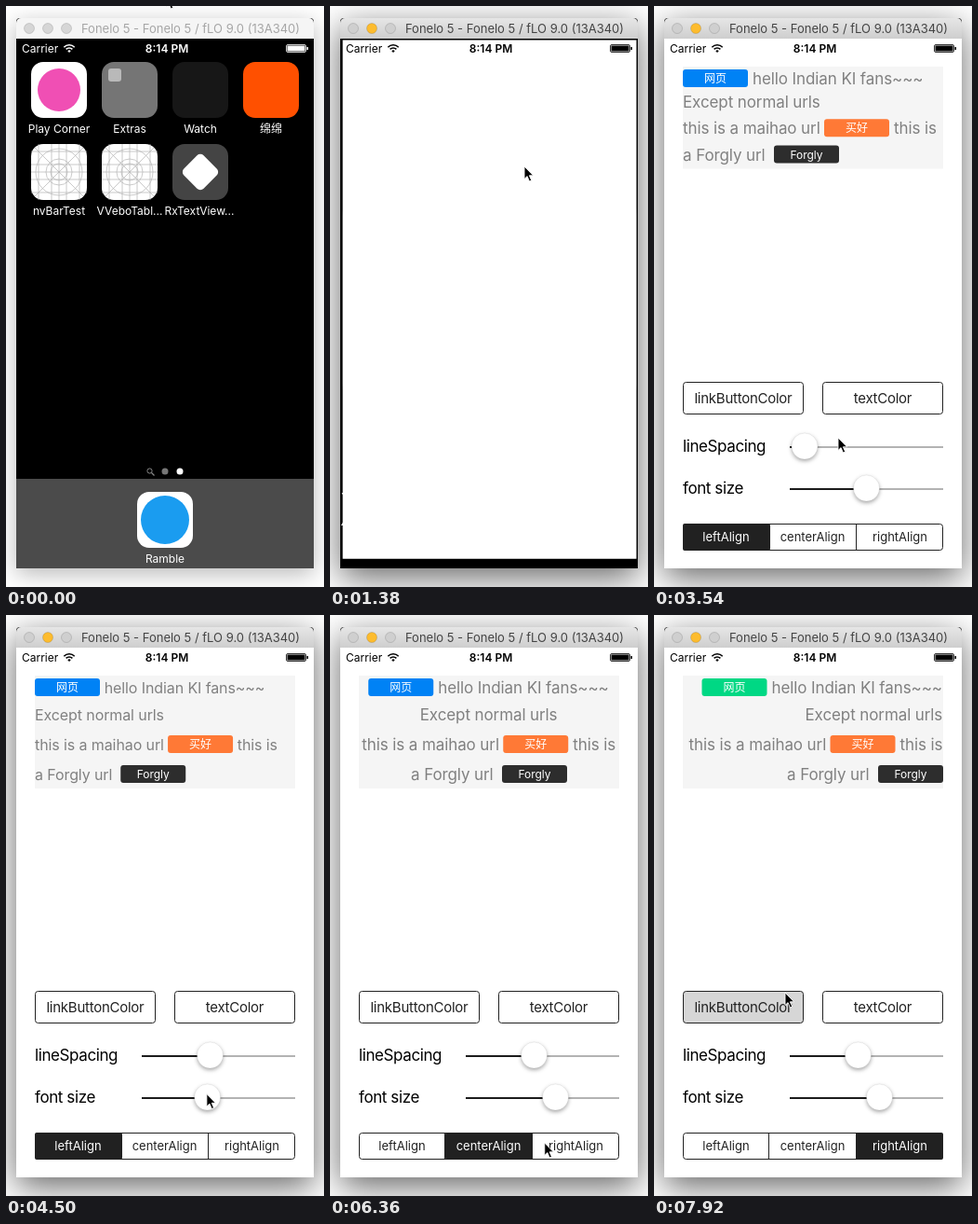
An HTML page that plays this animation: 342 by 623 pixels, repeating every 8000 ms.

```html
<!DOCTYPE html>
<html lang="en">
<head>
<meta charset="utf-8">
<title>Text view demo</title>
<style>
html, body { margin: 0; width: 100%; height: 100%; overflow: hidden; background: #fff; }
svg { display: block; width: 342px; height: 623px; font-family: Inter, "Noto Sans CJK SC", "Noto Sans CJK", sans-serif; }
.mid { text-anchor: middle; }
.s12 { font-size: 12px; }
.s13 { font-size: 13px; }
.s15 { font-size: 15px; letter-spacing: -.25px; }
.s17 { font-size: 17px; letter-spacing: -.4px; }
.edge { stroke: #222; }
.thumb { fill: #fff; stroke: #0001; filter: drop-shadow(0 2px 2px #0005); }
</style>
</head>
<body>
<svg viewBox="0 0 342 623">
  <defs>
    <clipPath id="screen"><path d="M11 35h320v568h-320z"/></clipPath>
    <linearGradient id="bar" x2="0" y2="1"><stop stop-color="#e6e6e6"/><stop offset="1" stop-color="#cecece"/></linearGradient>
    <g id="grid">
      <rect width="60" height="60" rx="13" fill="#fff"/>
      <g fill="none" stroke="#b4b4b4" stroke-width=".7">
        <path d="M8 0v60M22 0v60M30 0v60M38 0v60M52 0v60M0 8h60M0 22h60M0 30h60M0 38h60M0 52h60M4 4l52 52M56 4l-52 52"/>
        <circle cx="30" cy="30" r="9"/><circle cx="30" cy="30" r="14"/><circle cx="30" cy="30" r="25"/>
      </g>
    </g>
  </defs>

  <rect id="shadow" x="11" y="13" width="320" height="590" rx="4"/>
  <path id="title" d="M11 35V18a5 5 0 0 1 5-5h310a5 5 0 0 1 5 5v17z"/>
  <g id="lights" stroke="#0002"><circle cx="25" cy="24" r="5.5"/><circle id="yellow" cx="45" cy="24" r="5.5"/><circle cx="65" cy="24" r="5.5"/></g>
  <text id="caption" class="mid s13" x="198.5" y="28.5">Fonelo 5 - Fonelo 5 / fLO 9.0 (13A340)</text>

  <g clip-path="url(#screen)">
    <path d="M11 35h320v568h-320z"/>
    <g id="home" class="mid s12" fill="#fff">
      <rect x="27" y="60" width="60" height="60" rx="13"/><circle cx="57" cy="90" r="23" fill="#f04fb4"/>
      <rect x="103" y="60" width="60" height="60" rx="13" fill="#757575"/><rect x="110" y="67" width="14" height="14" rx="3" fill="#b9b9b9"/>
      <rect x="179" y="60" width="60" height="60" rx="13" fill="#171717"/>
      <rect x="255" y="60" width="60" height="60" rx="13" fill="#ff5000"/>
      <use href="#grid" x="27" y="148"/><use href="#grid" x="103" y="148"/>
      <rect x="179" y="148" width="60" height="60" rx="13" fill="#444"/>
      <rect x="194" y="163" width="30" height="30" rx="5" transform="rotate(45 209 178)"/>
      <rect id="dim" x="179" y="148" width="60" height="60" rx="13" fill="#000"/>
      <text x="57" y="136">Play Corner</text><text x="133" y="136">Extras</text>
      <text x="209" y="136">Watch</text><text x="285" y="136">绵绵</text>
      <text x="57" y="224">nvBarTest</text><text x="133" y="224">VVeboTabl...</text><text x="208" y="224">RxTextView...</text>
      <path d="M156.500 500.500l3 3" stroke="#888" stroke-width="1.300"/><circle cx="154.500" cy="498.500" r="2.600" fill="none" stroke="#888"/>
      <circle cx="171" cy="499" r="3.500" fill="#777"/><circle cx="187" cy="499" r="3.500"/>
      <path d="M11 507h320v96h-320z" fill="#4b4b4b"/>
      <rect x="141" y="521" width="60" height="60" rx="13"/><circle cx="171" cy="551" r="26" fill="#1a9cf0"/>
      <text x="171" y="597">Ramble</text>
    </g>

    <rect id="launch" fill="#fff"/>
    <g id="app">
      <rect id="panel" x="31" y="65" width="280" fill="#f5f5f5"/>
      <g id="lines"></g>
      <rect id="linkBtn" class="edge" x="31.500" y="403.500" width="129" height="34" rx="3"/>
      <rect class="edge" x="181.500" y="403.500" width="129" height="34" rx="3" fill="#fff"/>
      <text class="mid s15" x="96" y="426" fill="#222">linkButtonColor</text>
      <text class="mid s15" x="246" y="426" fill="#222">textColor</text>
      <text class="s17" x="31" y="478">lineSpacing</text>
      <text class="s17" x="31" y="523">font size</text>
      <path d="M146 473h165M146 518h165" stroke="#b3b3b3" stroke-width="2"/>
      <path id="filled" stroke="#1c1c1c" stroke-width="2"/>
      <circle id="space" class="thumb" cy="472" r="14"/>
      <circle id="size" class="thumb" cy="517" r="14"/>
      <rect id="picked" y="555" width="94" height="29" rx="2" fill="#212121"/>
      <rect class="edge" x="31.500" y="555.500" width="279" height="28" rx="3" fill="none"/>
      <path class="edge" d="M123.500 555v29M217.500 555v29"/>
      <g id="tabs" class="mid s13"><text x="77.500" y="574">leftAlign</text><text x="170.500" y="574">centerAlign</text><text x="264.500" y="574">rightAlign</text></g>
    </g>

    <g id="status" class="s12">
      <text x="17" y="49.500">Carrier</text>
      <text class="mid" x="173" y="49.500" font-weight="600">8:14 PM</text>
      <path d="M62.300 44.200a8 8 0 0 1 11.400 0M64.600 46.400a4.800 4.800 0 0 1 6.800 0" fill="none" stroke="currentColor" stroke-width="1.600"/>
      <path d="M66.300 48.200a2.400 2.400 0 0 1 3.400 0l-1.700 1.800z"/>
      <rect x="301.500" y="41.500" width="21" height="8" rx="1.500" fill="none" stroke="currentColor" stroke-width=".8"/>
      <path d="M302.500 42.500h19v6h-19zM323.500 44h1.500v3h-1.500z"/>
    </g>
  </g>
  <path id="cursor" d="M0 0V13.500L3.100 10.600L5.400 16L7.700 15L5.400 9.800H9.600Z" stroke="#fff" stroke-width=".9"/>
</svg>

<script>
const $ = id => document.getElementById(id);
const clamp = v => Math.min(1, Math.max(0, v));
const set = (el, attrs) => { for (const k in attrs) el.setAttribute(k, attrs[k]); };
const add = (tag, attrs, parent, text = '') => {
  const el = document.createElementNS('http://www.w3.org/2000/svg', tag);
  set(el, attrs);
  el.textContent = text;
  return parent.appendChild(el);
};

// keys: [time, ...values], eased between neighbours
function track(keys, t) {
  const i = keys.findIndex(k => k[0] > t);
  if (i < 0) return keys.at(-1).slice(1);
  if (!i) return keys[0].slice(1);
  const a = keys[i - 1], b = keys[i], p = (t - a[0]) / (b[0] - a[0]), e = p * p * (3 - 2 * p);
  return a.slice(1).map((v, n) => v + (b[n + 1] - v) * e);
}
const step = (keys, t) => keys.filter(k => k[0] <= t).at(-1)[1];

const cursorPath = [
  [120, 172, -13], [600, 209, 172], [1740, 209, 172], [2100, 166, 283], [2700, 134, 467],
  [2820, 157, 467], [3000, 157, 467], [3540, 198, 463], [3900, 216, 466], [4080, 216, 466],
  [4380, 227, 513], [4620, 205, 514], [5100, 241, 517], [5340, 241, 517], [5580, 221, 554],
  [5820, 172, 566], [6180, 172, 566], [6480, 262, 566], [6600, 262, 566], [7040, 141, 405]
];
const spacePath = [[3420, 159.5], [3540, 162], [3960, 219.5]];
const sizePath = [[4380, 228.5], [4620, 205], [5100, 242.5]];
const alignSteps = [[0, 0], [5880, 1], [6540, 2]];
const linkSteps = [[0, '#0082f5'], [7320, '#8d5de8'], [7620, '#f2506c'], [7890, '#00d884']];
const presses = [[7260, 7380], [7560, 7680], [7860, 8000]];

// Each item: x offset is fixed + scaled * font scale
const rows = [
  { y: 84, slack: 20.5, items: [{ tag: '网页' }, { text: 'hello Indian KI fans~~~', fixed: 70, scaled: 5 }] },
  { y: 109, slack: 131.5, items: [{ text: 'Except normal urls' }] },
  { y: 137, slack: 6.5, items: [{ text: 'this is a maihao url' }, { tag: '买好', color: '#ff7936', scaled: 152 }, { text: 'this is', fixed: 70, scaled: 157 }] },
  { y: 165, slack: 112, items: [{ text: 'a Forgly url' }, { tag: 'Forgly', color: '#2d2d2d', scaled: 98 }] }
];
for (const row of rows) {
  row.g = add('g', {}, $('lines'));
  for (const it of row.items) {
    it.g = add('g', {}, row.g);
    if (it.tag) {
      it.box = add('rect', { y: -16, width: 70, height: 19, rx: 3, fill: it.color || '' }, it.g);
      add('text', { class: 'mid s12', x: 35, y: -2, fill: '#fff' }, it.g, it.tag);
    } else it.label = add('text', { fill: '#808080', 'letter-spacing': -.1 }, it.g, it.text);
  }
}

function drawWindow(t) {
  const active = t >= 600;
  $('shadow').style.filter = active ? 'drop-shadow(0 10px 18px rgba(0,0,0,.6))' : 'drop-shadow(0 6px 12px rgba(0,0,0,.28))';
  set($('title'), { fill: active ? 'url(#bar)' : '#f5f5f5' });
  set($('lights'), { fill: active ? '#cfcfcf' : '#d6d6d6' });
  set($('yellow'), { fill: active ? '#fdbc2e' : '#d6d6d6' });
  set($('caption'), { fill: active ? '#444' : '#a6a6a6' });
}

function drawLaunch(t) {
  const p = clamp((t - 1020) / 396);
  const e = p < .5 ? 2 * p * p : 1 - 2 * (1 - p) ** 2;
  const x = 209 - 38 * e, y = 178 + 141 * e * e;
  const w = 60 + 260 * e, h = w + 248 * e * e;
  set($('home'), { transform: `translate(${x} ${y}) scale(${w / 60}) translate(-209 -178)` });
  set($('dim'), { opacity: t >= 780 ? .33 : 0 });
  set($('launch'), { x: x - w / 2, y: y - h / 2, width: w, height: h, rx: 14 * (1 - e), opacity: clamp(e * 1.6 - .07) });
  set($('app'), { opacity: clamp((t - 1500) / 420) });
  const ink = e < .5 ? '#fff' : '#000';
  set($('status'), { fill: ink, color: ink });
}

function drawApp(t) {
  const [space] = track(spacePath, t), [size] = track(sizePath, t);
  const gap = (space - 159.5) / 15;
  const scale = Math.floor(12 + (size - 146) / 16.5) / 17;
  const align = step(alignSteps, t);
  rows.forEach((row, i) => {
    const last = row.items.at(-1);
    const shrink = (1 - scale) * (280 - row.slack - (row.items.length > 1 || last.tag ? 70 : 0));
    set(row.g, { transform: `translate(${31 + (row.slack + shrink) * align / 2} ${row.y + i * gap})` });
    for (const it of row.items) {
      set(it.g, { transform: `translate(${(it.fixed || 0) + (it.scaled || 0) * scale} 0)` });
      if (it.label) set(it.label, { 'font-size': 17 * scale });
    }
  });
  set(rows[0].items[0].box, { fill: step(linkSteps, t) });
  set($('panel'), { height: 109 + 3 * gap });
  set($('space'), { cx: space });
  set($('size'), { cx: size });
  set($('filled'), { d: `M146 473H${space}M146 518H${size}` });
  set($('picked'), { x: [31, 124, 217][align] });
  [...$('tabs').children].forEach((el, i) => set(el, { fill: i === align ? '#fff' : '#222' }));
  set($('linkBtn'), { fill: presses.some(([a, b]) => t >= a && t < b) ? '#d6d6d6' : '#fff' });
}

const start = performance.now();
function frame() {
  const t = (performance.now() - start) % 8000;
  drawWindow(t);
  drawLaunch(t);
  drawApp(t);
  set($('cursor'), { transform: `translate(${track(cursorPath, t).join(' ')})` });
  requestAnimationFrame(frame);
}
frame();
</script>
</body>
</html>
```
